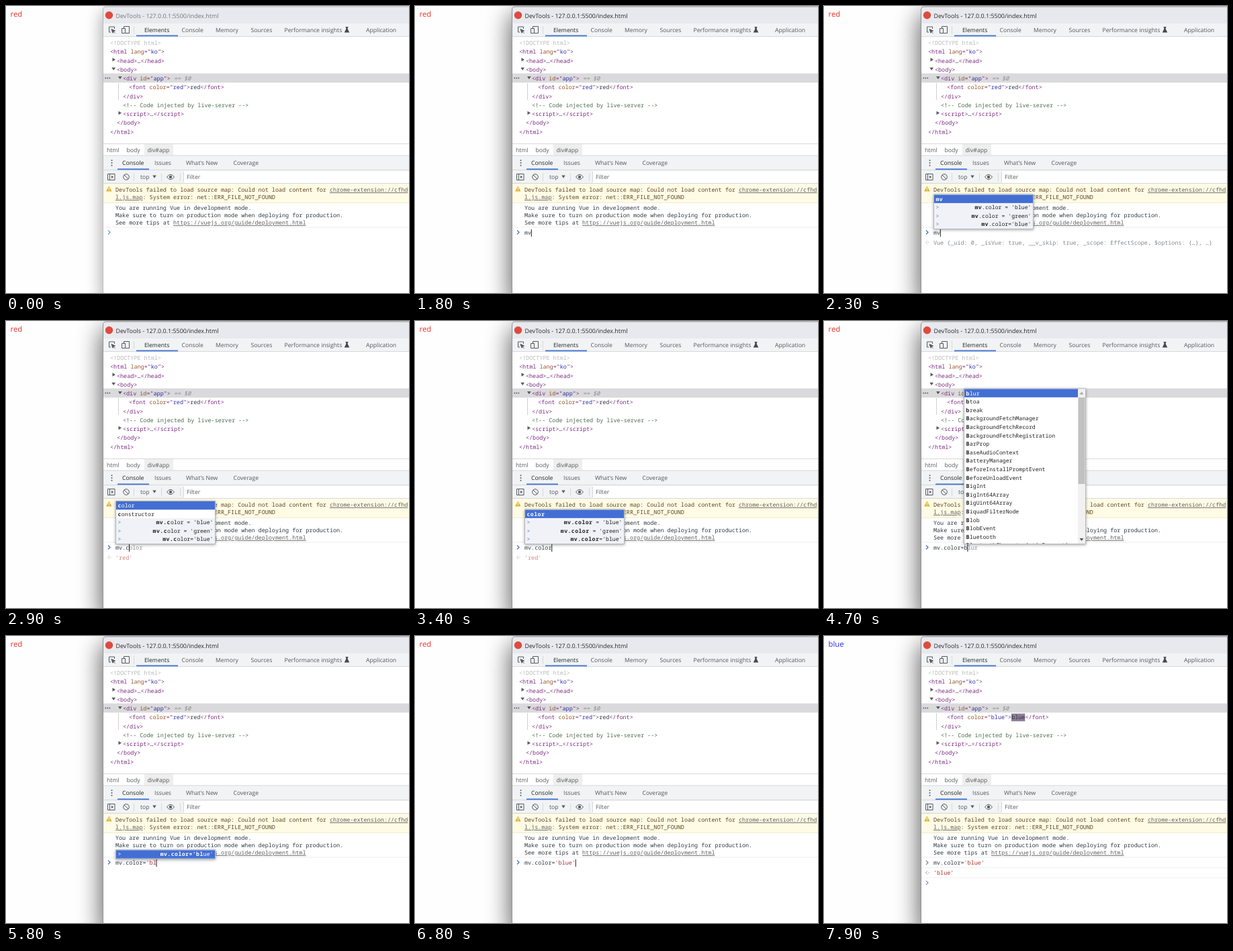
An HTML page that plays this animation: 600 px wide and 428 px high, repeating every 8 s.

```html
<!DOCTYPE html>
<html lang="en">
<head>
<meta charset="utf-8">
<title>Console session</title>
<style>
html, body { margin: 0; width: 100%; height: 100%; overflow: hidden; background: #fefefe; }
.stage { position: absolute; inset: 0; overflow: clip; contain: strict; }
.win { position: absolute; left: 144px; top: 1px; right: 0; bottom: 0; border-radius: 5px 0 0 0; }
.idle { box-shadow: 0 8px 26px rgba(0,0,0,.2); }
.active { box-shadow: 0 12px 36px rgba(0,0,0,.38); }
.win::after { content: ""; position: absolute; inset: 0 0 -60px; border-radius: inherit; box-shadow: inherit; }
svg { position: absolute; left: 0; top: 0; }
text { white-space: pre; text-rendering: geometricPrecision; }
.ui { font: 8.66px "Open Sans", "Noto Sans", sans-serif; fill: #54585c; }
.mono { font: 8.45px "Noto Sans Mono", "DejaVu Sans Mono", monospace; fill: #303942; }
.menu { font: 8.17px "Noto Sans Mono", "DejaVu Sans Mono", monospace; fill: #222; }
.menu .b { font-weight: bold; letter-spacing: .45px; }
.box { filter: drop-shadow(0 1px 2px rgba(0,0,0,.35)); }
.tag { fill: #7b2a80; }
.attr { fill: #94552a; }
.val { fill: #2e2ea4; }
.note { fill: #4a6b4c; }
.str { fill: #b0352c; }
.dim { fill: #8c8c8c; }
.faint { fill: #b9b9b9; }
.warn { fill: #5c4524; }
.link { fill: #5f5f5f; text-decoration: underline; }
.line { fill: none; stroke: #555a5f; }
</style>
</head>
<body>
<div class="stage">
<div class="win idle" id="idle"></div>
<div class="win active" id="active"></div>
<svg width="600" height="428" viewBox="0 0 600 428">
  <text id="page" x="6.5" y="16.3" style="font:11.3px 'Open Sans','Noto Sans',sans-serif"></text>

  <path d="M144 428V6q0-5 5-5H600V428Z" fill="#fff"/>
  <path d="M144 26V6q0-5 5-5H600V26Z" fill="#e8e9ee"/>
  <path id="edge" d="M144.500 428V6q0-5 5-5H600" fill="none" stroke="#939393"/>
  <circle cx="153.500" cy="13.800" r="5.700" fill="#dd4b3e"/>
  <text class="ui" id="title" x="163.500" y="17.600" style="font-size:8.93px">DevTools - 127.0.0.1:5500/index.html</text>

  <path fill="#f1f3f4" d="M145 26H600V46H145ZM145 223H600V265H145Z"/>
  <path fill="#fff" d="M264 246H600V264H264Z"/>
  <path fill="#eeeeee" d="M206 206H249V222.500H206Z"/>
  <path fill="#dadadc" d="M145 100.500H600V114.300H145Z"/>
  <path fill="#fffbe5" d="M145 265H600V293.500H145Z"/>
  <path class="line" style="stroke:#d6d8db" d="M145 45.500H600M145 205.500H600M145 223H600M145 244.500H600M145 264.500H600M190.500 30V42M190.500 249.500V261M231.500 249.500V261M259.500 249.500V261M264.500 247V263"/>
  <path class="line" style="stroke:#f2eccb" d="M145 293.500H600"/>
  <path class="line" style="stroke:#ededed" d="M145 330H600"/>
  <path class="line" style="stroke:#cfcfcf" d="M167.500 115V140"/>
  <path fill="#3d72d4" d="M194 43.500H256V45.200H194ZM166 242.500H213V244.200H166Z"/>

  <!-- toolbar icons -->
  <g class="line">
    <path d="M156 39H153.500V31H161.500V34"/>
    <path d="M157 34.500L162.500 37L160 38L159 40.200Z" fill="#555a5f"/>
    <path d="M159.800 38L162.500 40.800"/>
    <path d="M175.500 33V30.500H183.500V40.500H178M172.500 33.500H177.500V40.500H172.500Z"/>
    <path d="M151.500 250.500H162V259.500H151.500ZM154.500 250.500V259.500"/>
    <path d="M157 252.800V257.200L160 255Z" fill="#555a5f" stroke="none"/>
    <circle cx="179" cy="255" r="4.300"/>
    <path d="M176 252L182 258"/>
    <path d="M239.500 255Q245 247.500 250.500 255Q245 262.500 239.500 255Z"/>
    <circle cx="245" cy="255" r="1.700" fill="#555a5f"/>
  </g>
  <path fill="#44484c" d="M505.500 31H509.500V32H508.800V34.500L511.300 39.500H503.700L506.200 34.500V32H505.500Z"/>
  <g fill="#555a5f">
    <circle cx="157.500" cy="230.300" r="1"/><circle cx="157.500" cy="234" r="1"/><circle cx="157.500" cy="237.700" r="1"/>
    <circle cx="148.300" cy="107.500" r=".9"/><circle cx="151.300" cy="107.500" r=".9"/><circle cx="154.300" cy="107.500" r=".9"/>
    <path d="M218.300 252.500H223.700L221 256.700Z"/>
    <path d="M158.500 77.200L163 80L158.500 82.800ZM157.300 91.800H163L160.200 96ZM167 105H172.700L169.800 109.200ZM167.500 156.800L172 159.500L167.500 162.300Z"/>
  </g>
  <path fill="#e2b138" d="M153.300 268.600L157.600 276.400H149Z"/>
  <path stroke="#fff" d="M153.300 271V274M153.300 274.600V275.600"/>

  <g id="labels"></g>
  <rect id="flash" x="279" y="115.700" width="20.300" height="11.500"/>
  <g id="tree"></g>

  <g class="mono">
    <text class="warn" x="163" y="277">DevTools failed to load source map: Could not load content for <tspan class="link">chrome-extension://cfhd</tspan></text>
    <text class="warn" x="163" y="288"><tspan class="link">l.js.map</tspan>: System error: net::ERR_FILE_NOT_FOUND</text>
    <text x="163" y="304">You are running Vue in development mode.</text>
    <text x="163" y="315">Make sure to turn on production mode when deploying for production.</text>
    <text x="163" y="326">See more tips at <tspan class="link">https://vuejs.org/guide/deployment.html</tspan></text>
  </g>
  <g id="console"></g>
  <rect id="caret" y="333" width="1" height="11" fill="#222"/>
  <g id="menu" class="menu"></g>
</svg>
</div>

<script>
const LOOP = 8000, ENTER = 7100, CHAR = 5.07, ROW = 12.6, LEFT = 163;
const $ = id => document.getElementById(id);
const span = (cls, s) => `<tspan class="${cls}">${s}</tspan>`;
const label = (x, y, s, style = '') => `<text class="ui" x="${x}" y="${y}" style="${style}">${s}</text>`;
const code = (x, y, s, cls = '') => `<text class="mono ${cls}" x="${x}" y="${y}">${s}</text>`;
const tag = s => span('tag', `&lt;${s}&gt;`);

const dark = 'fill:#222';
$('labels').innerHTML = [
  [206, 38.8, 'Elements', dark], [261.5, 38.8, 'Console'], [312, 38.8, 'Memory'], [364.5, 38.8, 'Sources'],
  [414.5, 38.8, 'Performance insights'], [536, 38.8, 'Application'],
  [150, 217.7, 'html'], [179.5, 217.7, 'body'], [210.5, 217.7, 'div#app'],
  [173, 237.3, 'Console', dark], [221, 237.3, 'Issues'], [268, 237.3, "What's New"], [338.5, 237.3, 'Coverage'],
  [200, 258.2, 'top'], [269, 258.2, 'Filter']
].map(a => label(...a)).join('');

const tagWith = (name, attr, value) => tag(`${name} ${span('attr', attr)}="${span('val', value)}"`);

function tree(color) {
  return [
    [155, span('faint', '&lt;!DOCTYPE html&gt;')],
    [155, tagWith('html', 'lang', 'ko')],
    [165, tag('head') + '…' + tag('/head')],
    [165, tag('body')],
    [174, tagWith('div', 'id', 'app') + '<tspan class="dim" font-style="italic"> == $0</tspan>'],
    [183, tagWith('font', 'color', color) + color + tag('/font')],
    [174, tag('/div')],
    [174, span('note', '&lt;!-- Code injected by live-server --&gt;')],
    [174, tag('script') + '…' + tag('/script')],
    [165, tag('/body')],
    [155, tag('/html')]
  ].map(([x, s], i) => code(x, 58 + 13.25 * i, s)).join('');
}

const past = ["mv.color = 'blue'", "mv.color = 'green'", "mv.color='blue'"];
const vueProps = ['color', '$attrs', '$children', '$createElement', '$data', '$el', '$isServer', '$listeners',
  '$options', '$parent', '$props', '$refs', '$root', '$scopedSlots', '$slots', '$ssrContext', '$store', '$vnode', '_c'];
const globals = ['blur', 'btoa', 'break', 'BackgroundFetchManager', 'BackgroundFetchRecord',
  'BackgroundFetchRegistration', 'BarProp', 'BaseAudioContext', 'BatteryManager', 'BeforeInstallPromptEvent',
  'BeforeUnloadEvent', 'BigInt', 'BigInt64Array', 'BigUint64Array', 'BiquadFilterNode', 'Blob', 'BlobEvent',
  'Bluetooth', 'BluetoothCharacteristicProperties'];
const vuePreview = 'Vue {_uid: 0, _isVue: true, __v_skip: true, _scope: EffectScope, $options: {…}, …}';
const red = "'red'";

// typed = how many letters of each word are already entered
const small = (words, past, typed) => ({ x: 163, w: 149, words, past, typed });
const tall = (x, words, typed) => ({ x, w: 182, words, past: [], typed, scrolls: true });
const quoted = small([], past.slice(2), 0);

// [time, typed text, hint, menu, result preview]
const steps = [
  [0, ''],
  [1800, 'mv'],
  [1900, 'mv', '', small(['mv'], past, 2), vuePreview],
  [2400, 'mv.', '', tall(163, vueProps, 0), vuePreview],
  [2700, 'mv.c', 'olor', small(['color', 'constructor'], past, 1), red],
  [3000, 'mv.co', 'lor', small(['color', 'constructor'], past, 2), red],
  [3200, 'mv.col', 'or', small(['color'], past, 3), red],
  [3400, 'mv.color', '', small(['color'], past, 5), red],
  [3800, 'mv.color='],
  [4500, 'mv.color=b', 'lur', tall(208, globals, 1)],
  [4900, 'mv.color='],
  [5200, "mv.color='", '', quoted],
  [5500, "mv.color='b", '', quoted],
  [5800, "mv.color='bl", '', quoted],
  [6000, "mv.color='blu", '', quoted],
  [6300, "mv.color='blue"],
  [6500, "mv.color='blue'"],
  [ENTER, '']
];

const bold = (s, n) => span('b', s.slice(0, n)) + s.slice(n);
const rect = (x, y, w, h, fill, more = '') =>
  `<rect x="${x}" y="${y}" width="${w}" height="${h}" fill="${fill}" ${more}/>`;

function drawMenu(m, text) {
  if (!m) return '';
  const { x, w, words, past, typed, scrolls } = m;
  const h = scrolls ? 232.5 : (words.length + past.length) * ROW + 2;
  const top = 333 - h, inner = scrolls ? w - 12 : w - 2;
  let out = rect(x + .5, top + .5, w - 1, h - 1, '#fff', 'class="box" stroke="#b4b7bc"') +
    rect(x + 1, top + 1 + words.length * ROW, inner, past.length * ROW, '#f0f2f7') +
    rect(x + 1, top + 1, inner, ROW - .3, '#436fd4') +
    `<clipPath id="clip">${rect(x, top, w, h - 1, '#000')}</clipPath><g clip-path="url(#clip)">`;
  const item = (x, y, fill, s, anchor = 'start') =>
    `<text x="${x}" y="${y}" text-anchor="${anchor}" style="fill:${fill}">${s}</text>`;
  [...words, ...past].forEach((s, i) => {
    const y = top + ROW * i + 10, fill = i ? '#222' : '#fff';
    if (i < words.length) out += item(x + 3.5, y, fill, bold(s, typed));
    else out += item(x + 3.5, y, i ? '#5b78b8' : '#fff', '&gt;') +
      item(x + 145.5, y, fill, bold(s, s.startsWith(text) ? text.length : 4), 'end');
  });
  out += '</g>';
  if (scrolls) {
    const r = x + w - 12;
    out += rect(r, top + 1, 11, h - 2, '#f1f1f1') + rect(r + .5, top + 13.5, 10, 129, '#c1c1c1') +
      `<path d="M${r + 2.5} ${top + 9}h6l-3-4z" fill="#a8a8a8"/>` +
      `<path d="M${r + 2.5} ${top + h - 9}h6l-3 4z" fill="#555"/>`;
  }
  return out;
}

const prompt = (y, stroke) => `<path d="M152 ${y - 3}l3 3l-3 3" fill="none" stroke="${stroke}" stroke-width="1.2"/>`;
const result = (y, s, cls) =>
  `<path d="M154 ${y - 2.5}l-2.500 2.500l2.500 2.500" fill="none" stroke="#9a9a9a"/><circle cx="156" cy="${y}" r=".7" fill="#9a9a9a"/>` +
  code(LEFT, y + 3, s, cls);
const paint = s => s.replace(/'.*/, q => span('str', q));

function drawConsole([, text, hint = '', , preview], time) {
  if (time >= ENTER) {
    return prompt(338, '#858585') + code(LEFT, 341.3, paint("mv.color='blue'")) +
      result(353, "'blue'", 'str') + prompt(368, '#7f97c4') +
      '<path d="M145 345.500H600M145 360.500H600" stroke="#f1f1f1"/>';
  }
  let out = prompt(337.5, time < 1400 ? '#7d9ad2' : '#4a6cc0') + code(LEFT, 341.3, paint(text) + span('dim', hint));
  if (preview) {
    const str = preview === red;
    out += `<g opacity=".6"${str ? '' : ' font-style="italic"'}>${result(352.5, preview, str ? 'str' : '')}</g>`;
  }
  return out;
}

const clamp = v => Math.max(0, Math.min(1, v));
const mix = (a, b, k) => `rgb(${a.map((v, i) => Math.round(v + (b[i] - v) * k))})`;
let shown = '';

function render(t) {
  const step = steps.findLast(s => s[0] <= t);
  const done = t >= ENTER, color = done ? 'blue' : 'red';

  const key = step[0] + (t < 1400 ? 'a' : 'b');
  if (key !== shown) {
    shown = key;
    $('page').textContent = color;
    $('page').setAttribute('fill', done ? '#2a2aec' : '#ec2f28');
    $('tree').innerHTML = tree(color);
    $('console').innerHTML = drawConsole(step, t);
    $('menu').innerHTML = drawMenu(step[3], step[1]);
  }

  const focus = clamp((t - 100) / 200);
  $('active').style.opacity = focus;
  $('idle').style.opacity = 1 - focus;
  $('edge').style.opacity = .6 + .4 * focus;
  $('title').style.fill = mix([118, 118, 118], [38, 38, 38], focus);

  $('flash').style.fill = mix([158, 54, 153], [144, 126, 152], clamp((t - ENTER) / 300));
  $('flash').style.opacity = done ? 1 : 0;

  const blink = step[0] ? (t - step[0]) % 1000 < 500 : t >= 1100 && t < 1500;
  $('caret').setAttribute('x', LEFT + CHAR * step[1].length - (step[1] ? .3 : 0));
  $('caret').style.opacity = blink && !done ? 1 : 0;
}

function tick() {
  render(performance.now() % LOOP);
  requestAnimationFrame(tick);
}
tick();
</script>
</body>
</html>
```
